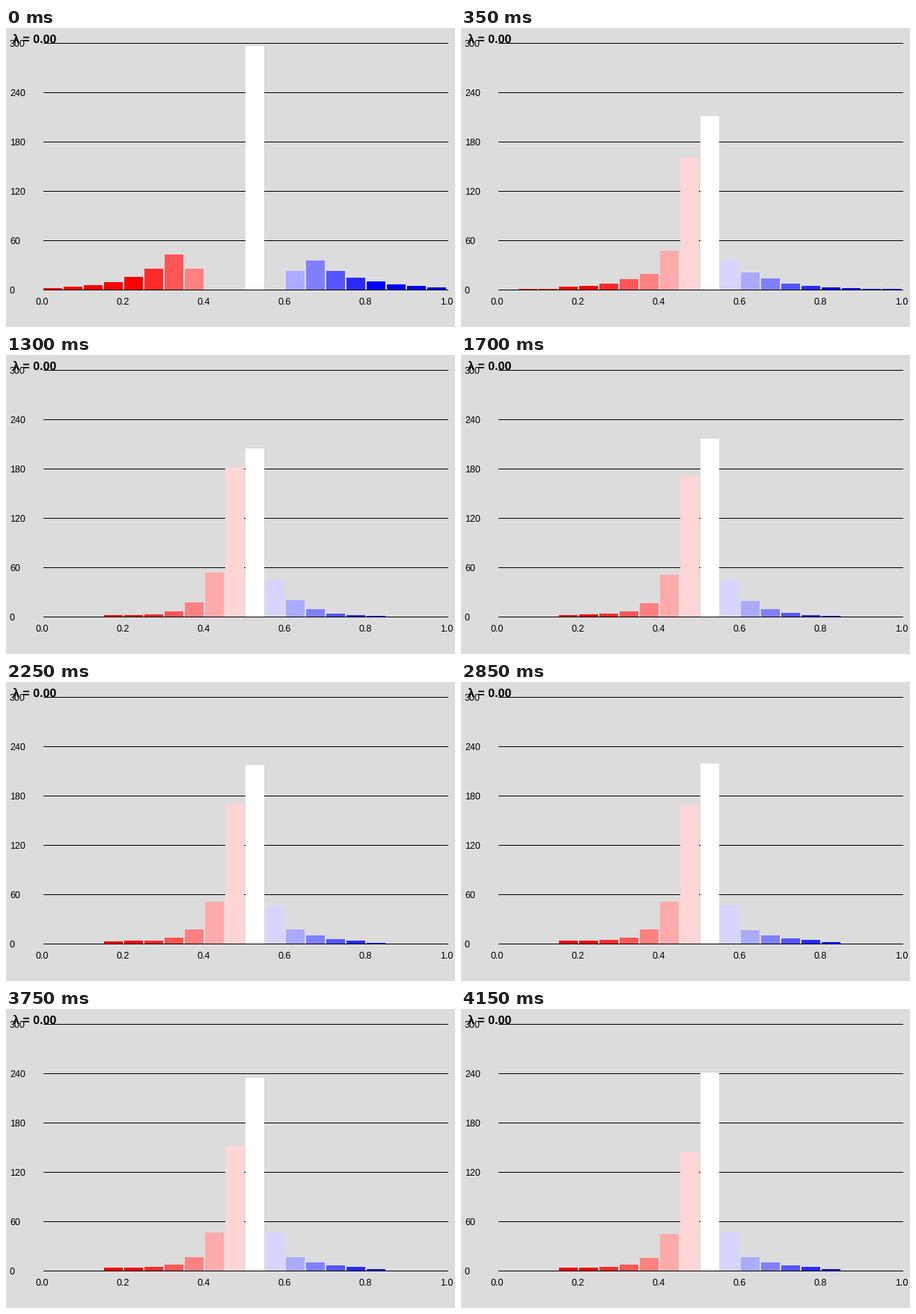
Animation, 600 px wide and 400 px high, one loop 4200 ms. Source, as a matplotlib script:

```python
import numpy as np
import matplotlib.pyplot as plt
from matplotlib.animation import FuncAnimation
from matplotlib.patches import Rectangle

W, H, DPI = 600, 400, 100
FRAMES, INTERVAL = 84, 50
LEFT, BASE = 50, 350
PITCH, BAR = 27, 25
BINS, MID = 20, 10
BIN = np.arange(BINS)

# The two tallest bars, on either side of 0.5, once the crowd has gathered
KEY_FRAMES = [18, 34, 57, 83]
LOW_PEAK = [213, 188, 185, 159]
HIGH_PEAK = [212, 238, 241, 265]


def start_heights():
    """Two polarised camps around a large undecided block."""
    h = np.where(BIN < MID, 47 * 0.6 ** abs(BIN - 6), 39 * 0.65 ** abs(BIN - 13))
    h[MID - 2:MID + 2] = 0
    h[MID] = 326
    return h


def settled_heights(frame):
    """A central peak with a steep left tail and a slowly growing right one."""
    drift = np.clip((frame - 30) / 25, 0, 1)
    floor = 2 + 2 * drift
    low = np.interp(frame, KEY_FRAMES, LOW_PEAK)
    left = np.where(BIN >= 3, floor + (low - floor) * 0.29 ** (MID - 1.0 - BIN), 0)

    k = BIN - MID
    early = 49 * 0.45 ** (k - 1.0)
    late = np.maximum(0, 35 * 0.13 ** (k - 1.0) + 19 - 2.9 * k)
    h = np.where(BIN < MID, left, early + drift * (late - early))
    h[MID] = np.interp(frame, KEY_FRAMES, HIGH_PEAK)
    return h


def heights(frame):
    rest = np.exp(-frame / 4)
    return np.round(rest * start_heights() + (1 - rest) * settled_heights(frame))


def bin_color(i):
    fade = max(0, 1 - abs(i - MID) / 6)
    return (1, fade, fade) if i < MID else (fade, fade, 1)


plt.rcParams["text.hinting"] = "none"
fig = plt.figure(figsize=(W / DPI, H / DPI), dpi=DPI, facecolor="#dcdcdc")
ax = fig.add_axes([0, 0, 1, 1])
ax.set_xlim(0, W)
ax.set_ylim(H, 0)
ax.axis("off")


def box(x, y, w, h, color, z):
    return ax.add_patch(Rectangle((x, y), w, h, facecolor=color, linewidth=0,
                                  antialiased=False, zorder=z))


def label(x, y, text, size=12.5, weight="normal"):
    ax.text(x, y, text, fontsize=size * 72 / DPI, family="Liberation Sans",
            weight=weight, color="black", ha="left", va="baseline", zorder=4)


for n in range(6):
    y = BASE - 66 * n
    box(LEFT, y, 541, 1, "black", 1)
    label(5, y + 5, str(60 * n))
    label(40 + 108 * n, 370, f"{0.2 * n:.1f}")
label(9, 20, "λ = 0.00", 16, "bold")

bars = [box(LEFT + PITCH * i, BASE, BAR, 0, bin_color(i), 2) for i in BIN]


def update(frame):
    for bar, h in zip(bars, heights(frame)):
        bar.set_y(BASE - h)
        bar.set_height(h)
        bar.set_visible(h > 0)
    return bars


anim = FuncAnimation(fig, update, frames=FRAMES, interval=INTERVAL,
                     init_func=lambda: update(0), repeat=True, repeat_delay=0)
plt.show()
```
